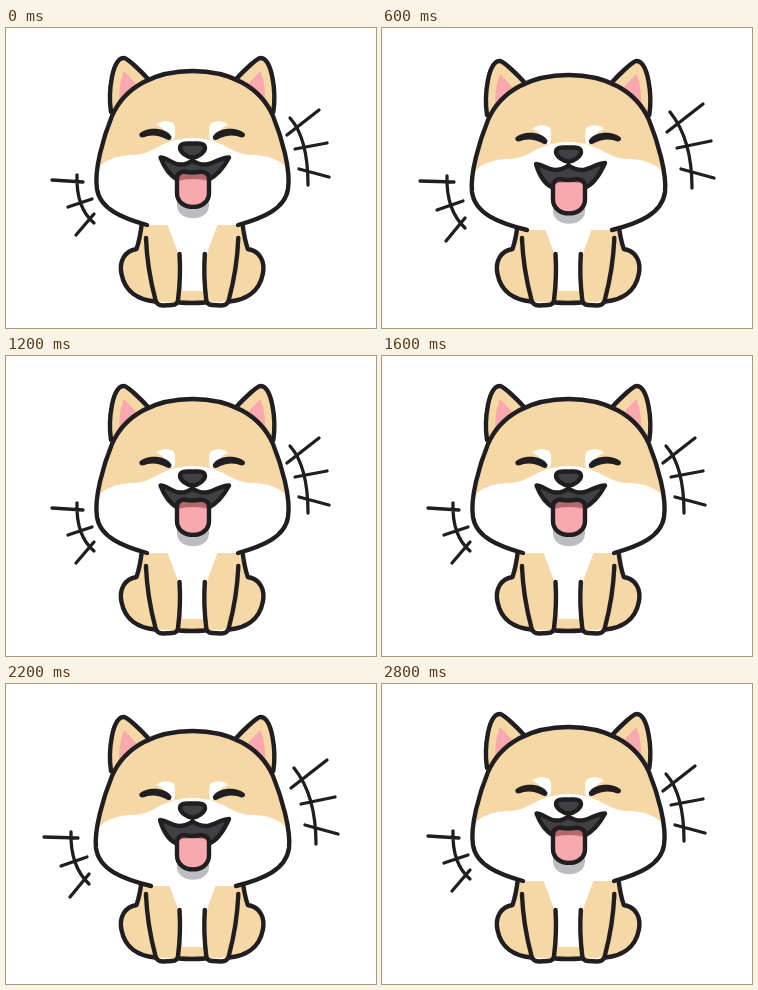
Animation of 370 by 300 pixels, one loop 3 s. Source, as an HTML page:

```html
<!DOCTYPE html>
<html lang="en">
<head>
<meta charset="utf-8">
<title>Happy puppy</title>
<style>
  html, body { margin: 0; width: 100%; height: 100%; overflow: hidden; background: #fff; }
  svg { display: block; width: 370px; height: 300px; }
  .line { fill: none; stroke: #201e20; stroke-width: 4.4; stroke-linecap: round; stroke-linejoin: round; }
  .thin { stroke-width: 3.3; }
  .tan { fill: #f6d8a6; }
  .white { fill: #fff; }
  .pink { fill: #f9a9ae; }
  .dark { fill: #414042; }
  .ink { fill: #201e20; }
  .shade { fill: #bcbdc0; }
  .deep { fill: #b5676b; }
</style>
</head>
<body>
<svg viewBox="0 0 370 300" id="stage"></svg>
<script>
const STEP = 200, LOOP = 3000;

const path = (cls, d) => `<path class="${cls}" d="${d}"/>`;
const outlined = (cls, d) => path(cls, d) + path('line', d);
const mirror = art => `<g transform="translate(372.3 0) scale(-1 1)">${art}</g>`;
const both = art => art + mirror(art);
const shift = (y, art) => `<g transform="translate(0 ${y})">${art}</g>`;

const poses = [
  {
    drop: 0, earDrop: 0,
    head: 'M141 197C116 190 94 181 91 161C88 142 97 110 106 88C119 58 150 43 186.5 43' +
          'C223 43 254 58 267 88C276 110 285 142 282 161C279 181 257 190 232 197',
    mouth: 'M154.5 129.5C161 130 167 136 173 136.5C179 137 183 135 186.5 132.5' +
           'C190 135 194 137 200 136.5C207 136 213 130 223 129.5C218 139 212 147 202 152L172 152C163 147 158 139 154.5 129.5Z',
    tongueTop: 143.5, tongueEnd: 179, deepEnd: 153, shadeEnd: 190.5,
    marks: 'M284 90Q302 110 302 157M281 107L313 82M289 121L321 115M293 141L323 149' +
           'M71 147Q70 180 88 195M46 152L77 154M62 179L86 171M70 207L88 186'
  },
  {
    drop: 4, earDrop: 3,
    head: 'M145 198C117 191 93 182 90 160C88 142 97 110 106 88C119 58 150 43 186.5 43' +
          'C223 43 254 58 267 88C276 110 285 142 283 160C280 182 257 191 230 198',
    mouth: 'M154 132C161 133 167 138 173 138C179 138 183 136 186.5 133.5' +
           'C190 136 194 138 200 138C207 138 213 132 223 131C218 142 211 153 202 156L172 156C163 153 157 142 154 132Z',
    tongueTop: 147, tongueEnd: 181.5, deepEnd: 152, shadeEnd: 192,
    marks: 'M288 84Q310 111 310 160M285 104L321 76M295 120L329 113M299 141L332 150' +
           'M65 148Q64 182 83 200M38 153L72 154M55 182L81 173M64 213L83 190'
  }
];

const haunch = 'M136 194Q134 211 130.5 221C118 223 113 234 115.5 246C119 264 133 272 149 273.5';

const body =
  both(path('tan', haunch + 'L190 275L190 194Z')) +
  path('white', 'M159 190L172 225L175 226L176 263L197 263L198 226L201 225L214 190Z') +
  path('line', 'M173 274.5Q186 275.5 199 274.5') +
  both(
    path('line', haunch) +
    path('line', 'M140 210Q141 240 149.5 272Q151 277.5 157 277.5L166 277Q171.5 277 172 272Q175 249 173.5 226')
  );

const ears = both(
  path('tan', 'M105 88C102 64 106 30 118 30C121 30 134 42 144 54L135 80Z') +
  path('pink', 'M118 43Q112 57 113.5 76L133 59Q126 51 118 43Z') +
  path('line', 'M105 84C102 64 106 30 118 30C121 30 134 42 143 52')
);

const brow = 'M150.5 97C154 92 166 92 168.5 97Q170 106 168 112.5L163 112Q162 101 150.5 97Z';
const eye = 'M133.5 105.5C141 98.5 160 99 165.5 108.5Q165.5 113.5 161 111.5Q148 104.5 137 109.5Q132.5 109.5 133.5 105.5Z';
const nose = 'M174 120Q174 115.5 181 115.5L192 115.5Q199 115.5 199 120C199 124 192 129.5 186.5 129.5C181 129.5 174 124 174 120Z';
const coat = 'M80 38L293 38L293 160Q282 127 246 127C225 127 220 111 186.5 110' +
             'C153 111 148 127 127 127Q91 127 80 160Z';

function tongue({ tongueTop: top, tongueEnd: end, deepEnd }) {
  const rim = `${top + 7}Q171 ${top + 1} 178 ${top}Q186.5 ${top + 2} 195 ${top}Q203 ${top + 1} 203`;
  const shape = `M171 ${rim} ${top + 7}L203 ${end - 14}C203 ${end + 4.5} 171 ${end + 4.5} 171 ${end - 14}Z`;
  return path('pink', shape) +
    path('deep', `M171 ${rim} ${deepEnd}Q187 ${deepEnd - 4} 171 ${deepEnd}Z`) +
    path('line', shape);
}

function face(p, id) {
  const end = p.shadeEnd;
  return `<clipPath id="${id}"><path d="${p.head}Z"/></clipPath>` +
    path('white', p.head + 'Z') +
    `<g clip-path="url(#${id})">${path('tan', coat)}</g>` +
    both(path('white', brow) + path('ink', eye)) +
    path('shade', `M171 172L171 ${end - 13}C171 ${end + 4} 203 ${end + 4} 203 ${end - 13}L203 172Z`) +
    outlined('dark', p.mouth) +
    tongue(p) +
    path('line thin', 'M186.5 129L186.5 133') +
    outlined('dark', nose) +
    path('line', p.head);
}

const stage = document.getElementById('stage');
stage.innerHTML = body + poses.map((p, i) =>
  `<g class="pose">${shift(p.earDrop, ears)}${shift(p.drop, face(p, 'head' + i))}` +
  `${path('line thin', p.marks)}</g>`).join('');

const groups = stage.querySelectorAll('.pose');
const start = performance.now();

function render(now) {
  const time = Math.max(0, now - start) % LOOP;
  const active = Math.floor(time / STEP) % 2;
  groups.forEach((g, i) => g.setAttribute('visibility', i === active ? 'visible' : 'hidden'));
  requestAnimationFrame(render);
}
render(start);
</script>
</body>
</html>
```
